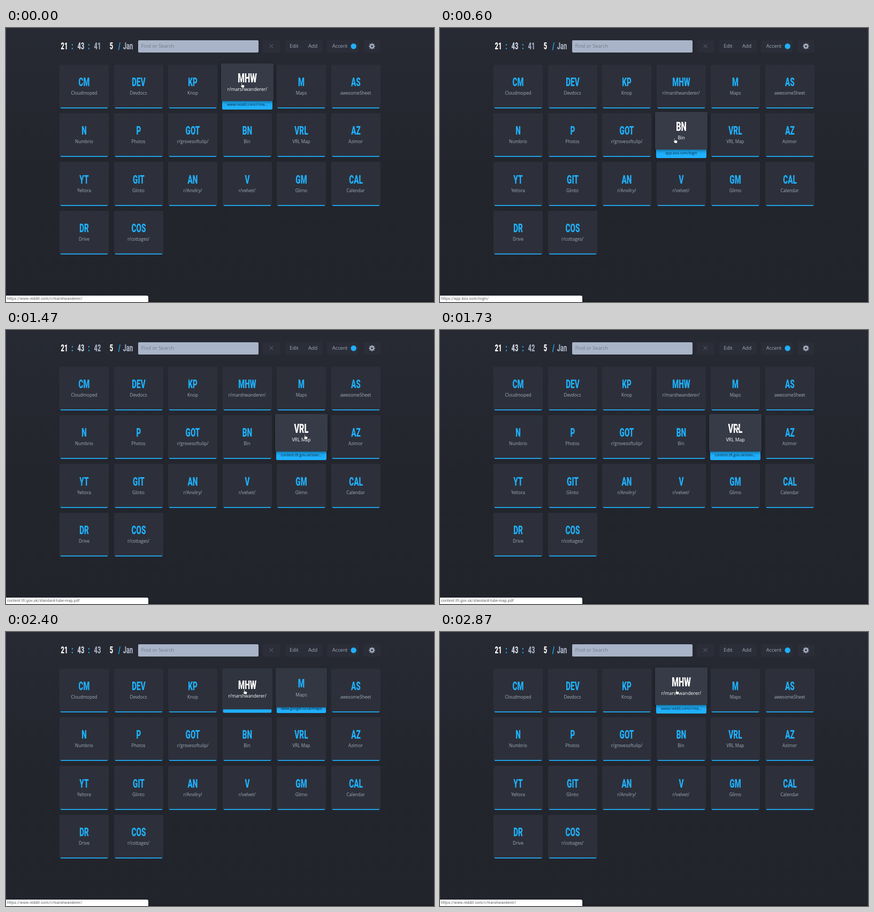
Write an HTML page that moves like this. It is 800x514 px and loops after 2.94 s.

```html
<!DOCTYPE html>
<html lang="en">
<head>
<meta charset="utf-8">
<title>Start page</title>
<style>
  html, body { margin: 0; width: 100%; height: 100%; overflow: hidden; }
  body {
    --blue: #1fb0fc; --grey: #a2abbd;
    background: linear-gradient(#272a33, #23252d 55%, #22242c);
    font: 9.2px "Open Sans", sans-serif; color: var(--grey);
  }
  #stage { position: relative; width: 800px; height: 514px; overflow: hidden; }
  #stage div, #stage span, svg { position: absolute; }
  span { transform: translate(-50%, -50%); white-space: nowrap; line-height: 1.3; }
  .head { transform: translate(-50%, -50%) scaleX(.62); font: 900 18px/1.2 Roboto, sans-serif; }
  .blue { color: var(--blue); }
  .white { color: #fff; }
  .bar { top: 23px; height: 22.5px; border-radius: 2px; background: #2b2e38; }
  .tile { width: 92px; height: 82px; }
  .back {
    top: 3.5px; width: 92px; height: 80px; border-radius: 2px;
    background: var(--blue); color: #0d2c40;
  }
  .back span { left: 50%; top: 71.5px; font-size: 6.7px; }
  .front { width: 92px; border-radius: 2px; transform-origin: 50% 0; }
  .front .head { left: 50%; top: calc(50% - 7px); font-size: 22px; color: var(--blue); }
  .front .name { left: 50%; top: calc(50% + 13.3px); font-size: 8.15px; }
  .on .front span { color: #fff; }
  #edge { left: 0; top: 511.5px; width: 800px; height: 3px; background: #1a1b21; }
  #status {
    left: 0; top: 502px; width: 263.5px; height: 12px; padding-left: 2px;
    border-radius: 0 3px 0 0; background: #fff; color: #5a5d62;
    font: 7px/12px Roboto, sans-serif; letter-spacing: .19px; white-space: nowrap;
  }
</style>
</head>
<body>
<div id="stage">
  <span class="head white" style="left:109px;top:34px">21</span>
  <span class="head blue" style="left:124px;top:34px">:</span>
  <span class="head" style="left:140px;top:34px;color:#cbd2de">43</span>
  <span class="head blue" style="left:155px;top:34px">:</span>
  <span class="head" id="seconds" style="left:170.5px;top:34px">41</span>
  <span class="head white" style="left:196.5px;top:34px">5</span>
  <span class="head blue" style="left:212px;top:34px">/</span>
  <span class="head" style="left:228px;top:34px">Jan</span>

  <div class="bar" style="left:247px;width:224.5px;background:#a9b4c8"></div>
  <span style="left:283.5px;top:34px;color:#727b8e">Find or Search</span>
  <div class="bar" style="left:480px;width:32.5px"></div>
  <div class="bar" style="left:521.5px;width:70px"></div>
  <span style="left:538.5px;top:34px">Edit</span>
  <span style="left:573.5px;top:34px">Add</span>
  <div class="bar" style="left:600px;width:59px"></div>
  <span style="left:624px;top:34px">Accent</span>
  <div class="bar" style="left:668px;width:32px"></div>
  <svg width="800" height="60" fill="none" style="left:0;top:0">
    <path d="M492.5 30.5l7 7m0-7l-7 7" stroke="#4b515f" stroke-width="1.2"/>
    <circle cx="649.7" cy="34.2" r="5.2" fill="#1fb0fc"/>
    <g stroke="#a2abbd">
      <circle cx="684" cy="34.2" r="3.1" stroke-width="2.6"/>
      <circle cx="684" cy="34.2" r="4.8" stroke-width="2" pathLength="16" stroke-dasharray="1" stroke-dashoffset=".5"/>
    </g>
  </svg>

  <div id="tiles"></div>
  <div id="edge"></div>
  <div id="status"></div>
  <svg id="hand" width="10" height="11" style="left:0;top:0;z-index:9">
    <path d="M2.4 6V1.3q0-.9.8-.9t.8.9V3.9q3.9-.1 4.3 1.6V7.4L7.6 9.8H3.6L.6 6.2q-.2-1 .7-.9z"
          fill="#fff" stroke="#111" stroke-width=".7"/>
  </svg>
</div>
<script>
const LOOP = 2940, RAISE = 300;
const $ = id => document.getElementById(id);

const links = `CM Cloudmoped,DEV Devdocs,KP Knop,MHW r/marshwanderer/,M Maps,AS awesomeSheet,
N Numbrio,P Photos,GOT r/grovesoftulip/,BN Bin,VRL VRL Map,AZ Azimor,
YT Yeltora,GIT Glinto,AN r/Anvilry/,V r/velvet/,GM Glimo,CAL Calendar,
DR Drive,COS r/cottages/`.split(',').map(s => s.trim());

// tile index: [address on the tile, address in the status bar]
const urls = {
  3: ['www.reddit.com/r/ma…', 'https://www.reddit.com/r/marshwanderer/'],
  4: ['www.google.co.uk/maps', 'https://www.google.co.uk/maps'],
  9: ['app.box.com/login', 'https://app.box.com/login/'],
  10: ['content.tfl.gov.uk/stan…', 'content.tfl.gov.uk/standard-tube-map.pdf']
};

// [time the pointer enters, tile index]
const visits = [[2280 - LOOP, 3], [280, 9], [950, 10], [1840, 4], [2280, 3]];

// [time, x, y] of the pointer
const path = [
  [0, 442, 107], [100, 442, 107], [480, 440, 211], [820, 440, 211],
  [1000, 534, 218], [1250, 560, 203], [1470, 560, 200], [1620, 560, 198],
  [2050, 540, 107], [2150, 540, 107], [2440, 442, 112], [2870, 443, 112], [LOOP, 442, 107]
];

const tiles = links.map((link, i) => {
  const [, code, name] = link.match(/^(\S+) (.+)$/);
  const el = document.createElement('div');
  el.className = 'tile';
  el.style.left = 100 + i % 6 * 101.5 + 'px';
  el.style.top = 68.5 + Math.floor(i / 6) * 91.4 + 'px';
  el.innerHTML = `<div class="back"><span>${urls[i] ? urls[i][0] : ''}</span></div>
    <div class="front"><span class="head">${code}</span><span class="name">${name}</span></div>`;
  $('tiles').append(el);
  return el;
});

const smooth = u => {
  u = Math.min(1, Math.max(0, u));
  return u * u * (3 - 2 * u);
};
const mix = (a, b, u) => a + (b - a) * u;

function lift(i, t) {
  return visits.reduce((sum, [start, tile], k) => {
    if (tile !== i) return sum;
    const end = visits[k + 1] ? visits[k + 1][0] : Infinity;
    return sum + smooth((t - start) / RAISE) - smooth((t - end) / RAISE);
  }, 0);
}

function poseTile(el, h, on) {
  const [back, front] = el.children;
  el.classList.toggle('on', on);
  el.style.zIndex = h > 0 ? 1 : 0;
  back.style.transform = `scale(${mix(.967, 1.022, h)})`;
  front.style.height = mix(80.6, 65.5, h) + 'px';
  front.style.transform = `translateY(${-2.5 * h}px) scale(${1 + .067 * h})`;
  front.style.background = `rgb(${mix(45, 54, h)}, ${mix(48, 59, h)}, ${mix(58, 71, h)})`;
  front.style.boxShadow = `0 ${2 * h}px ${6 * h}px rgba(0, 0, 0, ${.45 * h})`;
}

function draw() {
  const t = performance.now() % LOOP;
  const current = visits.filter(v => v[0] <= t).pop()[1];
  tiles.forEach((el, i) => poseTile(el, lift(i, t), i === current));
  $('status').textContent = urls[current][1];
  $('seconds').textContent = 41 + (t >= 930) + (t >= 1930);

  const k = path.findIndex(p => p[0] > t);
  const [t0, x0, y0] = path[k - 1], [t1, x1, y1] = path[k];
  const u = smooth((t - t0) / (t1 - t0));
  $('hand').style.transform = `translate(${mix(x0, x1, u) - 4.5}px, ${mix(y0, y1, u) - 4.5}px)`;
  requestAnimationFrame(draw);
}
draw();
</script>
</body>
</html>
```
